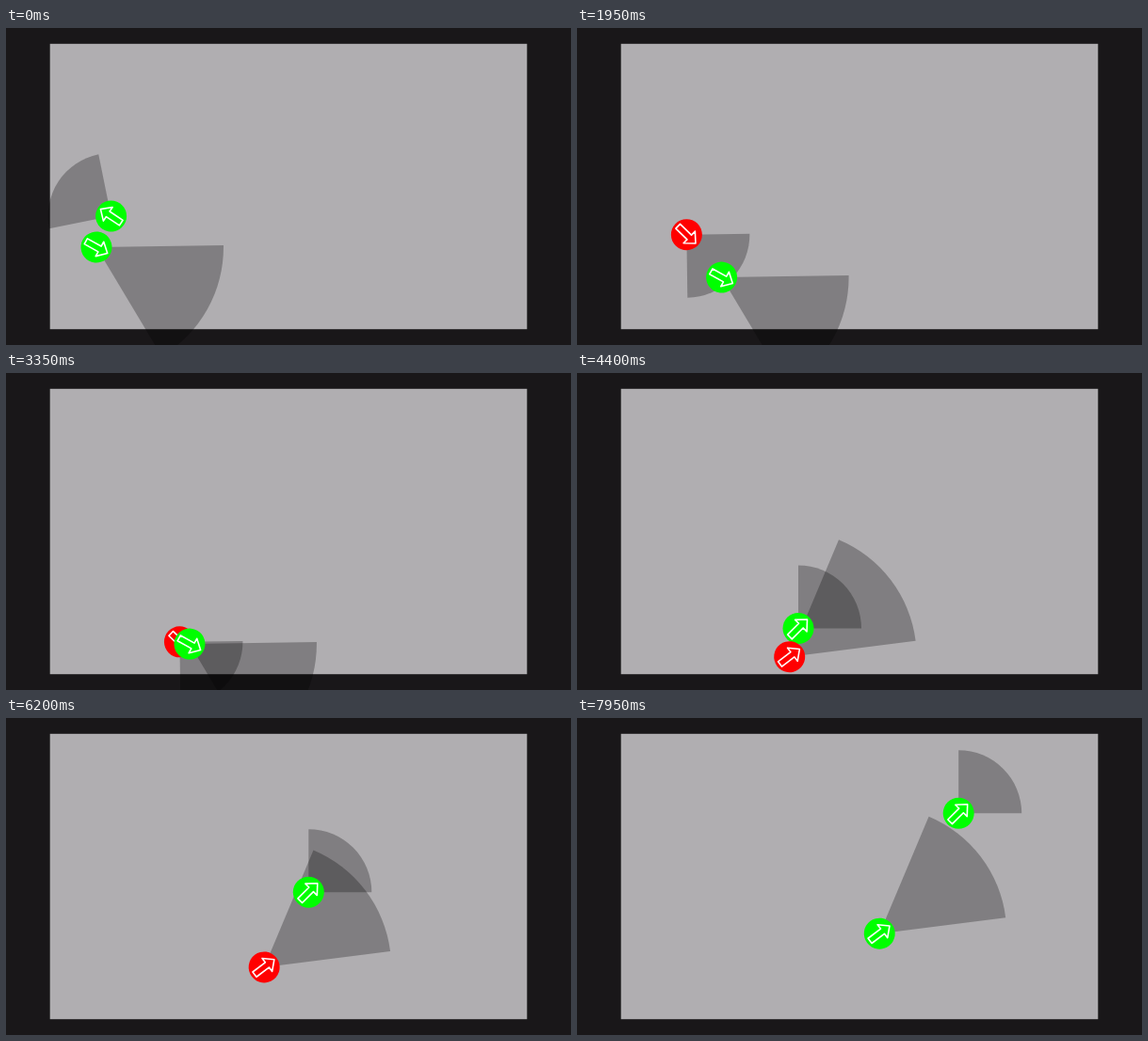
An HTML page with a canvas that plays this animation: 600x337 px, repeating every 8 s.

```html
<!DOCTYPE html>
<html lang="en">
<head>
<meta charset="utf-8">
<title>Two robots with fields of view</title>
<style>
html, body { margin: 0; width: 100%; height: 100%; overflow: hidden; background: #191719; }
canvas { display: block; }
</style>
</head>
<body>
<canvas id="stage" width="600" height="337"></canvas>
<script>
const ctx = document.getElementById('stage').getContext('2d');
const LOOP = 8000, STEP = 50, BODY = 16.5, RAD = Math.PI / 180;
const ARENA = { left: 46.7, top: 16.8, right: 553.3, bottom: 320.2 };

// A robot drives straight on and takes its next heading (degrees) at each wall.
const scout = { x: 111.6, y: 200, speed: 3.39, headings: [213.5, 44.2, -45], range: 67, half: 45 * RAD };
const guard = { x: 96, y: 233, speed: 1.69, headings: [29.1, -37.2], range: 135, half: 30 * RAD };

// Distance along one axis until the body touches the wall ahead.
function reach(pos, dir, low, high) {
  return ((dir < 0 ? low + BODY : high - BODY) - pos) / dir;
}

function poseAt(robot, step) {
  let { x, y } = robot, heading, left = robot.speed * step;
  for (const degrees of robot.headings) {
    heading = degrees * RAD;
    const dx = Math.cos(heading), dy = Math.sin(heading);
    const toWall = Math.min(reach(x, dx, ARENA.left, ARENA.right), reach(y, dy, ARENA.top, ARENA.bottom));
    const run = Math.min(left, toWall);
    x += dx * run;
    y += dy * run;
    left -= run;
    if (left <= 0) break;
  }
  return { ...robot, x, y, heading };
}

function sees(a, b) {
  const dx = b.x - a.x, dy = b.y - a.y, dist = Math.hypot(dx, dy);
  const turn = Math.atan2(dy, dx) - a.heading;
  const off = Math.abs(Math.atan2(Math.sin(turn), Math.cos(turn)));
  return dist < a.range + BODY && off < a.half + Math.asin(Math.min(1, BODY / dist));
}

function drawView({ x, y, heading, half, range }) {
  ctx.fillStyle = 'rgba(0, 0, 0, .275)';
  ctx.beginPath();
  ctx.moveTo(x, y);
  ctx.arc(x, y, range, heading - half, heading + half);
  ctx.fill();
}

// Arrow along +x, mirrored about its axis.
function arrowPath() {
  const tip = 13.4, neck = 4, barb = 8.8, tail = -12.8, shaft = 3.3;
  ctx.beginPath();
  ctx.moveTo(tip, 0);
  ctx.lineTo(neck, barb);
  ctx.lineTo(neck, shaft);
  ctx.lineTo(tail, shaft);
  ctx.lineTo(tail, -shaft);
  ctx.lineTo(neck, -shaft);
  ctx.lineTo(neck, -barb);
  ctx.closePath();
}

function drawBody({ x, y, heading }, alert) {
  ctx.save();
  ctx.translate(x, y);
  ctx.rotate(heading);
  ctx.fillStyle = alert ? '#f00' : '#0f0';
  ctx.beginPath();
  ctx.arc(0, 0, BODY, 0, 2 * Math.PI);
  ctx.fill();
  ctx.strokeStyle = '#fff';
  ctx.lineWidth = 1.6;
  ctx.lineJoin = 'round';
  arrowPath();
  ctx.stroke();
  ctx.restore();
}

function frame() {
  const step = Math.floor(performance.now() % LOOP / STEP);
  const a = poseAt(scout, step), b = poseAt(guard, step);
  ctx.fillStyle = '#191719';
  ctx.fillRect(0, 0, 600, 337);
  ctx.fillStyle = '#b0aeb1';
  ctx.fillRect(ARENA.left, ARENA.top, ARENA.right - ARENA.left, ARENA.bottom - ARENA.top);
  drawView(a);
  drawView(b);
  drawBody(a, sees(a, b));
  drawBody(b, sees(b, a));
  requestAnimationFrame(frame);
}
frame();
</script>
</body>
</html>
```
